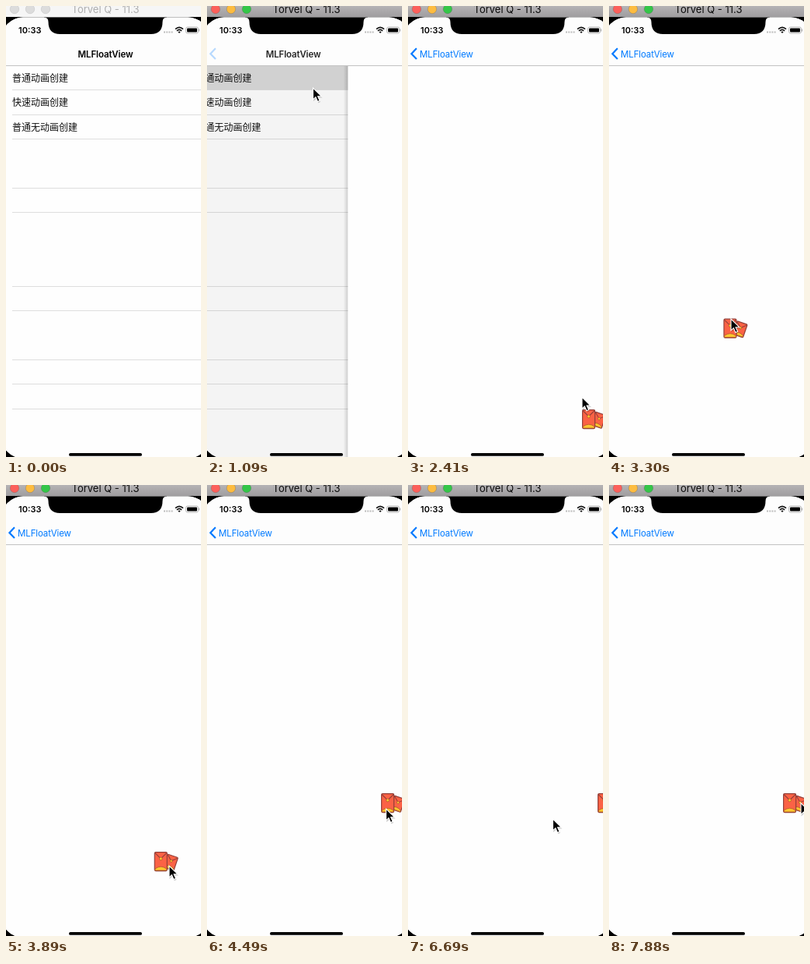
Write an HTML page that moves like this. It is 251 by 578 pixels and loops after 8000 ms.

```html
<!DOCTYPE html>
<html lang="zh">
<head>
<meta charset="utf-8">
<title>MLFloatView</title>
<style>
html, body { margin: 0; width: 100%; height: 100%; overflow: hidden; background: #000; }
svg { display: block; width: 251px; height: 578px; }
text { font-family: Inter, Roboto, "Noto Sans CJK SC", "Noto Sans CJK", sans-serif; }
.rows text { font-family: "Noto Sans CJK SC", "Noto Sans CJK", "Noto Sans CJK JP", sans-serif; font-size: 12px; fill: #111; }
.rows path { stroke: #dedede; fill: none; }
.label { font-size: 11.5px; letter-spacing: -.13px; }
.bar { fill: #f6f6f6; }
.caption { font-size: 13px; text-anchor: middle; fill: #adadad; }
.light { fill: #dcdcdc; stroke: #cdcdcd; stroke-width: .8; }
.active .bar { fill: url(#metal); }
.active .caption { fill: #0a0a0a; }
.active .light { stroke: rgba(0, 0, 0, .18); }
.active .close { fill: #fc605b; }
.active .mini { fill: #fdbc40; }
.active .zoom { fill: #34c648; }
.packet { fill: #fb6245; stroke: #93403a; stroke-width: 1.2; stroke-linejoin: round; }
.fold { fill: none; stroke: #93403a; stroke-width: 1.1; }
.gold { fill: #ffc72f; stroke: #a9542c; stroke-width: .7; }
</style>
</head>
<body>
<svg id="stage" viewBox="0 0 251 578">
  <defs>
    <linearGradient id="metal" x2="0" y2="1">
      <stop stop-color="#b5b3b5"/><stop offset="1" stop-color="#9f9d9f"/>
    </linearGradient>
    <linearGradient id="shade">
      <stop stop-opacity="0"/><stop offset="1" stop-opacity=".16"/>
    </linearGradient>
    <clipPath id="screen"><rect x="-6" y="14.5" width="268" height="565.5" rx="28"/></clipPath>
  </defs>

  <rect width="251" height="578"/>
  <g clip-path="url(#screen)">
    <rect y="14" width="251" height="564" fill="#fefefe"/>
    <g id="list" class="rows">
      <rect id="tap" y="77" width="290" height="31" fill="#d9d9d9"/>
      <path id="lines"/>
      <text x="8" y="96.5">普通动画创建</text>
      <text x="8" y="128">快速动画创建</text>
      <text x="8" y="159.5">普通无动画创建</text>
    </g>
    <g id="page">
      <rect x="-251" y="77" width="251" height="503" opacity=".04"/>
      <rect x="-6" y="77" width="6" height="503" fill="url(#shade)"/>
      <rect y="77" width="260" height="503" fill="#fefefe"/>
    </g>

    <rect y="14" width="251" height="62" fill="#fdfdfd"/>
    <path d="M0 76.5h251" stroke="#c2c2c2"/>
    <text id="title" class="label" x="128" y="65.5" text-anchor="middle" font-weight="600">MLFloatView</text>
    <path id="chevron" d="M11 54.3L4.4 61.2L11 68.1" fill="none" stroke="#007aff" stroke-width="2.2"/>
    <text id="back" class="label" x="15" y="65.5" fill="#007aff">MLFloatView</text>

    <path d="M49 14v.5q5.500 0 5.500 6q0 15.500 15 15.500h117q15 0 15-15.500q0-6 5.500-6v-.5z"/>
    <text x="16" y="35" font-size="11" font-weight="600">10:33</text>
    <path d="M203 33.500h12" stroke="#bdbdbd" stroke-width="2" stroke-dasharray="2 1.200"/>
    <path d="M218 29.700q5-4.600 10 0M219.900 31.800q3.100-2.800 6.200 0" fill="none" stroke="#111" stroke-width="1.700"/>
    <path d="M221.400 33.300q1.600-1.400 3.200 0l-1.600 1.700z" fill="#111"/>
    <rect x="231.500" y="27" width="16" height="8" rx="2.200" fill="none" stroke="#a8a8a8" stroke-width=".8"/>
    <rect x="233" y="28.500" width="13" height="5" rx="1"/>
    <path d="M248.700 29.500v3" stroke="#a8a8a8"/>
    <rect x="81" y="573" width="94" height="3.800" rx="1.900"/>
  </g>

  <rect class="bar" width="251" height="14"/>
  <circle class="light close" cx="11" cy="4" r="5.700"/>
  <circle class="light mini" cx="31" cy="4" r="5.700"/>
  <circle class="light zoom" cx="51" cy="4" r="5.700"/>
  <text class="caption" x="128" y="9">Torvel Q - 11.3</text>

  <g id="float">
    <g transform="translate(21.300 13.800) rotate(19)">
      <rect class="packet" x="-7" y="-8.800" width="14" height="17.600" rx="1.200"/>
      <path class="gold" d="M-6.400 8.200v-1.600q6.400-4.500 12.800 0v1.600z"/>
      <path class="fold" d="M-6.600-8L0-2L6.600-8"/>
      <circle class="gold" cy="-2" r="1.500"/>
    </g>
    <rect class="packet" x=".6" y=".6" width="16" height="24" rx="1.500"/>
    <path class="gold" d="M1.200 24v-2q7.400-5.500 14.800 0v2z"/>
    <path class="fold" d="M1 1.500L8.600 9L16.200 1.500"/>
    <circle class="gold" cx="8.600" cy="9" r="1.900"/>
  </g>

  <g id="cursor">
    <path d="M.5 1.500v15.500l3.600-3.300l2.600 5.600l2.800-1.200l-2.500-5.500h5z" opacity=".2"/>
    <path d="M0 0v14.800l3.400-3.100l2.500 5.700l2.700-1.200l-2.500-5.500h4.700z" stroke="#fff" stroke-width="1.100"/>
  </g>
</svg>
<script>
const LOOP = 8000, START = 500, STEP = 147.3;
const $ = id => document.getElementById(id);

// Turning points of the pointer: [step, x, y]
const turns = [
  [0, 190, 140], [2, 136.5, 105], [7, 136.5, 105], [13, 231, 533], [15, 223, 531],
  [19, 157, 401], [23, 210, 488], [27, 230.5, 415], [28, 230.5, 415], [31, 194, 459],
  [35, 231.5, 423.5], [40, 130, 443], [44, 243, 413], [47, 247, 407.5]
];

function ramp(k, from, to) {
  const u = Math.max(0, Math.min(1, (k - from) / (to - from)));
  return u * u * (3 - 2 * u);
}

const mix = (a, b, f) => a.map((v, i) => v + (b[i] - v) * f);

// Each leg eases from one turning point to the next.
function pointer(k) {
  return turns.slice(1).reduce(
    (pos, [end, ...to], i) => mix(pos, to, ramp(k, turns[i][0], end)),
    turns[0].slice(1)
  );
}

// Slides in, trails the pointer while dragged, snaps to the edge, tucks away and returns.
function floater(k) {
  const [px, py] = pointer(k - .7);
  const entry = [216 + 8 * ramp(k, 6, 7), 517];
  const dragged = mix(entry, [px - 15, py - 11], ramp(k, 13, 14.5));
  const [x, y] = mix(dragged, [224, 395], ramp(k, 24, 27));
  return [x + 20 * (ramp(k, 33, 35) - ramp(k, 48, 50)), y];
}

function move(id, x, y = 0) {
  $(id).setAttribute("transform", `translate(${x} ${y})`);
}

function fade(id, value) {
  $(id).style.opacity = Math.max(0, Math.min(1, value));
}

function draw(t) {
  const k = Math.floor((t - START) / STEP);
  const push = ramp(k, 2.94, 6);

  $("stage").classList.toggle("active", k >= 1);
  fade("tap", k >= 3 ? 1 : 0);
  move("list", -81 * push);
  move("page", 251 * (1 - push));
  fade("page", k > 3 ? 1 : 0);
  move("title", -61 * push);
  fade("title", 1 - push * push * 2);
  fade("chevron", push);
  move("back", 60 * (1 - push));
  fade("back", push * 2 - 1);

  move("float", ...floater(k));
  fade("float", k >= 6 ? 1 : 0);
  move("cursor", ...pointer(k));
  fade("cursor", k >= 0 ? 1 : 0);
}

$("lines").setAttribute("d", [1, 2, 3, 5, 6, 9, 10, 12, 13, 14]
  .map(n => `M8 ${Math.floor(76.2 + n * 31.43) + .5}h290`).join(""));

const begin = performance.now();
function tick() {
  draw((performance.now() - begin) % LOOP);
  requestAnimationFrame(tick);
}
tick();
</script>
</body>
</html>
```
